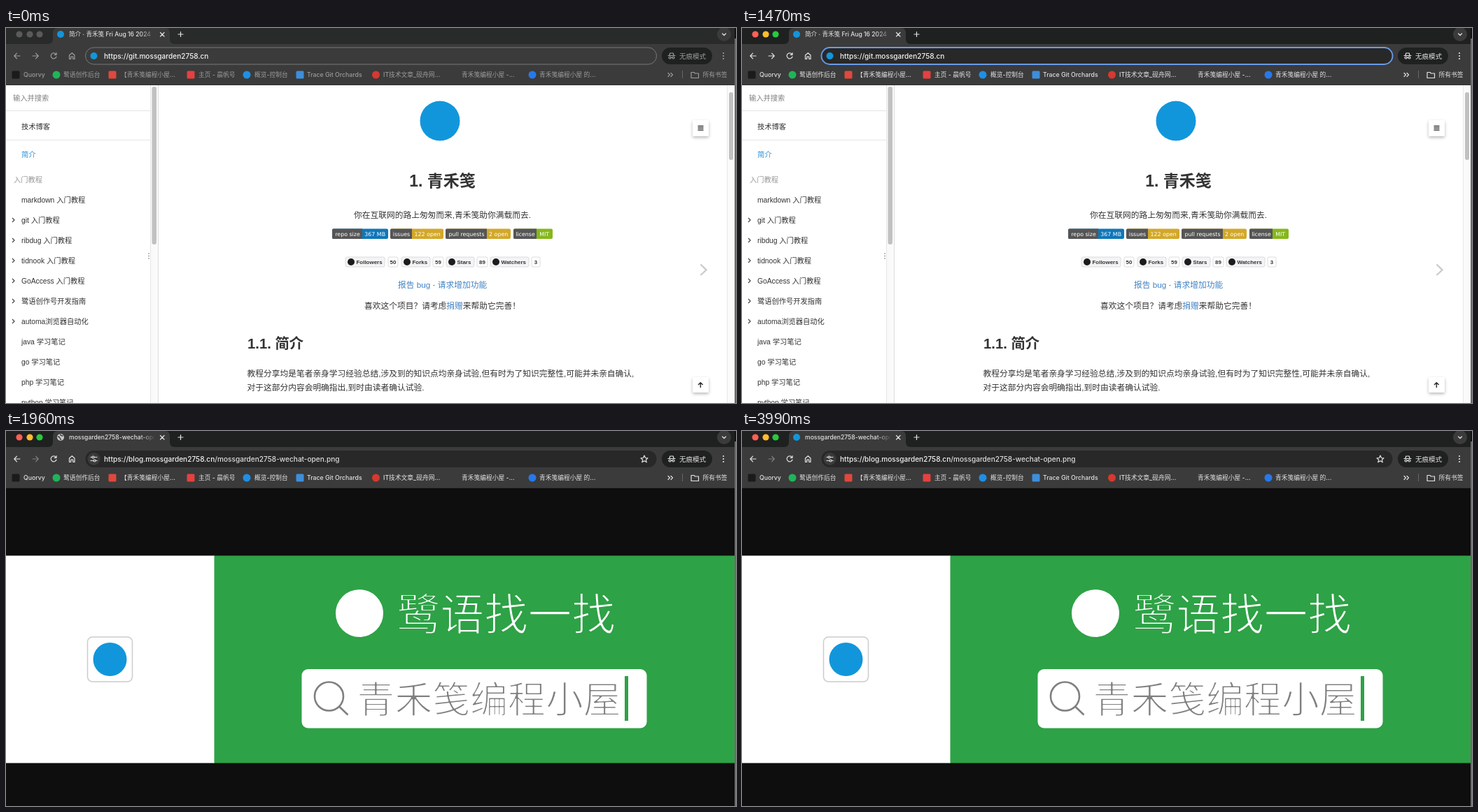
These frames come from a looping animation (1043x537 px, 4.13 s). An HTML page:

```html
<!DOCTYPE html>
<html lang="zh-CN">
<head>
<meta charset="utf-8">
<title>Browser demo</title>
<style>
html, body { margin: 0; width: 100%; height: 100%; overflow: hidden; background: #fff; }
svg { display: block; width: 100vw; height: 100vh; }
text { white-space: pre; }
.ui { font-family: Inter, "Noto Sans CJK SC", "Noto Sans CJK", sans-serif; font-weight: 500; }
.doc { font-family: "Liberation Sans", "Noto Sans CJK SC", "Noto Sans CJK", sans-serif; }
.badge { font-family: "DejaVu Sans", sans-serif; font-size: 7.9px; fill: #fff; }
.line { fill: none; stroke: currentColor; stroke-width: 1.2; stroke-linecap: round; stroke-linejoin: round; }
/* A stroke in the background colour thins the glyphs to a light weight. */
.thin { stroke-width: 1.9; stroke-linejoin: round; }
</style>
</head>
<body>
<svg id="stage" viewBox="0 0 1043 537" preserveAspectRatio="none">
  <defs>
    <linearGradient id="fade">
      <stop offset="0" stop-color="#3b3b3b" stop-opacity="0"/>
      <stop offset="1" stop-color="#3b3b3b"/>
    </linearGradient>
    <clipPath id="tabClip"><rect x="88" y="0" width="124" height="20"/></clipPath>
    <filter id="shadow" x="-50%" y="-50%" width="200%" height="200%">
      <feDropShadow dx="0" dy="2" stdDeviation="2.2" flood-opacity=".28"/>
    </filter>
  </defs>

  <g id="blog" class="doc" fill="#333">
    <rect width="1043" height="537" fill="#fff"/>
    <path d="M0 118.5H206M0 160.5H206M206.5 82V537" stroke="#e6e6e6" fill="none"/>
    <rect x="207" y="82" width="10" height="455" fill="#fafafa"/>
    <path d="M217.5 82V537" stroke="#dcdcdc"/>
    <rect x="208.5" y="84" width="6.5" height="226" rx="3.2" fill="#c1c1c1"/>
    <g id="menu" font-size="10.25"></g>
    <g fill="#aaa"><circle cx="204" cy="323" r="1"/><circle cx="204" cy="326.5" r="1"/><circle cx="204" cy="330" r="1"/></g>

    <circle cx="620" cy="133" r="28.5" fill="#1296db"/>
    <text x="623.5" y="227" font-size="23" font-weight="700" text-anchor="middle">1. 青禾笺</text>
    <g font-size="11.74">
      <text x="497" y="272">你在互联网的路上匆匆而来,青禾笺助你满载而去.</text>
      <text x="560" y="372" fill="#4183c4">报告 bug<tspan fill="#333"> · </tspan>请求增加功能</text>
      <text x="512" y="401.5">喜欢这个项目？请考虑<tspan fill="#4183c4">捐赠</tspan>来帮助它完善！</text>
      <text x="344.5" y="499">教程分享均是笔者亲身学习经验总结,涉及到的知识点均亲身试验,但有时为了知识完整性,可能并未亲自确认,</text>
      <text x="344.5" y="518.5">对于这部分内容会明确指出,到时由读者确认试验.</text>
    </g>
    <text x="345" y="458.5" font-size="20.3" font-weight="700">1.1. 简介</text>
    <g id="badges"></g>
    <g id="counts" font-size="7.95" font-weight="700"></g>

    <path d="M992.5 338.5L1000.5 346.3L992.5 354" fill="none" stroke="#ccc" stroke-width="2.4"/>
    <g filter="url(#shadow)" fill="#fff">
      <rect x="981" y="132" width="23" height="23" rx="2"/>
      <rect x="981" y="500" width="23" height="22" rx="2"/>
    </g>
    <path d="M988.5 140.5H996.5M988.5 143.2H996.5M988.5 145.9H996.5M992.3 515V508M989 511L992.3 507.7L995.6 511" fill="none" stroke="#333" stroke-width="1.5"/>
    <rect x="1030" y="82" width="11" height="455" fill="#fafafa"/>
    <path d="M1030.5 82V537" stroke="#e8e8e8"/>
    <rect x="1033" y="92" width="6" height="97" rx="3" fill="#c1c1c1"/>
  </g>

  <g id="poster" class="doc">
    <rect width="1043" height="537" fill="#0e0e0e"/>
    <rect y="178.5" width="298" height="297" fill="#fff"/>
    <rect x="297.5" y="178.5" width="743.5" height="297" fill="#2ea246"/>
    <rect x="116.5" y="295" width="64" height="64" rx="7" fill="#fff" stroke="#ccc" stroke-width="1.5"/>
    <circle cx="148.5" cy="327" r="24" fill="#1296db"/>
    <circle cx="505" cy="261" r="34" fill="#fff"/>
    <text class="thin" x="558" y="284.5" font-size="62.6" fill="#fff" stroke="#2ea246">鹭语找一找</text>
    <rect x="422.5" y="341" width="493" height="84.5" rx="9" fill="#fff"/>
    <path d="M482 380a20.5 20.5 0 1 1-41 0a20.5 20.5 0 1 1 41 0M476 394.5L488.5 406.5" fill="none" stroke="#808080" stroke-width="2.6"/>
    <text class="thin" x="501.5" y="404" font-size="53.9" fill="#808080" stroke="#fff">青禾笺编程小屋</text>
    <rect x="884" y="351" width="5" height="64" fill="#2ea246"/>
  </g>

  <g id="chrome" class="ui">
    <rect id="strip" width="1043" height="24" fill="#1f2020"/>
    <path d="M0 23H60Q67 23 67 16V7Q67 0 74 0H227Q234 0 234 7V16Q234 23 241 23H1043V82H0Z" fill="#3b3b3b"/>
    <circle cx="1026" cy="9" r="10" fill="#3b3b3b"/>
    <g id="lights"></g>
    <circle id="tabIcon" cx="78" cy="9" r="5" fill="#1296db"/>
    <g id="globe">
      <circle cx="78" cy="9" r="5" fill="#c8c8c8"/>
      <path d="M74 8q2.5 0 3 2t2 3M77 4.5q1 2.5 4.500 2.500" fill="none" stroke="#3b3b3b" stroke-width="1.3"/>
    </g>
    <g clip-path="url(#tabClip)"><text id="title" x="90" y="12" font-size="8.6" fill="#e3e3e3"></text></g>
    <rect x="192" y="2" width="21" height="16" fill="url(#fade)"/>
    <path d="M220.5 6.5L226 12M226 6.5L220.5 12M249.5 5.5V12.5M246 9H253M1023.5 8L1026 10.5L1028.5 8" class="line" color="#e3e3e3"/>

    <rect id="omnibox" x="113.5" y="28" width="816" height="24" rx="12"/>
    <circle id="siteDisc" cx="125.5" cy="40" r="9" fill="#3b3b3b"/>
    <circle id="siteIcon" cx="125.5" cy="40" r="5" fill="#1296db"/>
    <path id="info" class="line" color="#e3e3e3" d="M130.5 40a5 5 0 1 1-10 0a5 5 0 1 1 10 0M125.5 39.5V42.5M125.5 37.4V37.5"/>
    <path id="tune" class="line" color="#e3e3e3" d="M121 37.5H123M126.5 37.5H130M121 42.5H124.5M128 42.5H130M126 37.5a1.5 1.5 0 1 1-3 0a1.5 1.5 0 1 1 3 0M128 42.5a1.5 1.5 0 1 1-3 0a1.5 1.5 0 1 1 3 0"/>
    <text id="url" x="140" y="43.6" font-size="10.1" fill="#f4f4f4"><tspan id="host"></tspan><tspan id="path" fill="#dedede"></tspan></text>
    <rect id="caret" y="34.5" width="1" height="11.5" fill="#fff"/>
    <path id="star" class="line" color="#e3e3e3" d="M912 35L913.5 38.5L917 38.8L914.3 41.2L915.2 44.8L912 42.8L908.8 44.8L909.7 41.2L907 38.8L910.5 38.5Z"/>

    <rect x="937" y="28" width="72" height="24" rx="12" fill="#1f2020"/>
    <g id="tools">
      <path class="line" d="M20 40H12M15.5 36.2L11.8 40L15.5 43.8"/>
      <path id="forward" class="line" d="M38 40H46M42.5 36.2L46.2 40L42.5 43.8"/>
      <path id="reload" class="line" d="M71.2 37.3A4 4 0 1 0 72 41M72 35.5V38.3H69.2"/>
      <path id="stop" class="line" d="M65 37L71 43M71 37L65 43"/>
      <path class="line" d="M90.5 39L94.3 35.7L98 39V44.5H95.8V41.2H92.7V44.5H90.5Z"/>
      <path class="line" d="M946 39.5H956M948 39L948.8 36H953.2L954 39M950 42.5a1.5 1.5 0 1 1-3 0a1.5 1.5 0 1 1 3 0M955 42.5a1.5 1.5 0 1 1-3 0a1.5 1.5 0 1 1 3 0M950 42.3H952"/>
      <text x="962" y="43.5" font-size="9.5" fill="currentColor">无痕模式</text>
      <g fill="currentColor"><circle cx="1025" cy="36" r="1.1"/><circle cx="1025" cy="40" r="1.1"/><circle cx="1025" cy="44" r="1.1"/></g>
      <g id="marks" font-size="8.75" fill="currentColor"></g>
      <path class="line" d="M946 64.5L948.5 67L946 69.5M950 64.5L952.5 67L950 69.5M979 63.5H983L984.5 65H989.5V71.5H979Z"/>
    </g>
    <path d="M966.5 61V72" stroke="#666"/>
    <path d="M0 81.5H1041" stroke="#323232"/>
  </g>
  <path d="M1042 0V537" stroke="#6a6a6a" stroke-width="2"/>
  <path d="M1042 0V15" stroke="#111" stroke-width="2"/>
</svg>
<script>
const LOOP = 4130;
const $ = id => document.getElementById(id);

function add(parent, tag, attrs, text) {
  const el = document.createElementNS('http://www.w3.org/2000/svg', tag);
  for (const key in attrs) el.setAttribute(key, attrs[key]);
  if (text) el.textContent = text;
  parent.appendChild(el);
  return el;
}
const rect = (parent, x, y, width, height, fill, more) =>
  add(parent, 'rect', { x, y, width, height, fill, ...more });
const label = (parent, x, y, text, more) => add(parent, 'text', { x, y, ...more }, text);

function buildMenu() {
  const menu = $('menu');
  label(menu, 10, 104, '输入并搜索', { fill: '#808080' });
  label(menu, 22, 144.5, '技术博客');
  label(menu, 22, 184.5, '简介', { fill: '#2a8fd8' });
  label(menu, 11, 220.5, '入门教程', { fill: '#999' });
  const items = ['markdown 入门教程', '>git 入门教程', '>ribdug 入门教程', '>tidnook 入门教程',
    '>GoAccess 入门教程', '>鹭语创作号开发指南', '>automa浏览器自动化',
    'java 学习笔记', 'go 学习笔记', 'php 学习笔记', 'python 学习笔记'];
  items.forEach((item, i) => {
    const y = 246 + i * 29;
    label(menu, 22, y + 3.7, item.replace('>', ''));
    if (item[0] === '>') add(menu, 'path', { d: `M9 ${y - 3}l3 3l-3 3`, fill: 'none', stroke: '#444', 'stroke-width': 1.2 });
  });
}

function buildBadges() {
  const badges = [
    [466, 509, 546, 'repo size', '367 MB', '#0f77b8'],
    [549, 580, 625, 'issues', '122 open', '#d3a829'],
    [628, 687, 721, 'pull requests', '2 open', '#d3a829'],
    [725, 758, 781, 'license', 'MIT', '#85b81a']
  ];
  for (const [x, mid, end, name, value, color] of badges) {
    rect($('badges'), x, 287.5, end - x, 14.5, color, { rx: 2 });
    add($('badges'), 'path', { d: `M${mid} 287.5H${x + 2}q-2 0-2 2v10.5q0 2 2 2H${mid}Z`, fill: '#555' });
    const style = { class: 'badge', 'text-anchor': 'middle' };
    label($('badges'), (x + mid) / 2 + .5, 297.7, name, style);
    label($('badges'), (mid + end) / 2 - .3, 297.7, value, style);
  }
  const counts = [
    [485, 541, 'Followers', 546, 560, '50'], [565, 606, 'Forks', 610, 625, '59'],
    [629, 669, 'Stars', 673, 688, '89'], [692, 747, 'Watchers', 751, 763, '3']
  ];
  const box = { rx: 2, stroke: '#d3d3d3', 'stroke-width': .8 };
  for (const [x, end, name, cx, cend, count] of counts) {
    rect($('counts'), x, 328, end - x, 14, '#f3f4f5', box);
    rect($('counts'), cx, 328, cend - cx, 14, '#fff', box);
    add($('counts'), 'circle', { cx: x + 8, cy: 335, r: 5, fill: '#1c1c1c' });
    label($('counts'), x + 15.5, 338, name);
    label($('counts'), (cx + cend) / 2, 338, count, { 'text-anchor': 'middle' });
  }
}

function buildBookmarks() {
  const marks = [
    [14, '#1b1b1b', 25, 'Quorvy'], [72, '#20b45a', 82, '鹭语创作后台', 1],
    [152, '#e0483c', 164, '【青禾笺编程小屋...'], [264, '#e5413f', 275, '主页 - 晨帆号'],
    [344, '#1f8fe5', 355, '概览-控制台', 1], [420, '#3d8edb', 430, 'Trace Git Orchards'],
    [528.5, '#d8382f', 539, 'IT技术文章_砚舟网...', 1], [0, '', 651, '青禾笺编程小屋 -...'],
    [752, '#2878e8', 762, '青禾笺编程小屋 的...', 1], [0, '', 995.5, '所有书签']
  ];
  for (const [cx, color, x, name, round] of marks) {
    if (color) rect($('marks'), cx - 5.5, 61.5, 11, 11, color, { rx: round ? 5.5 : 1.5 });
    label($('marks'), x, 70, name);
  }
}

const lights = [19, 34, 48].map(cx => add($('lights'), 'circle', { cx, cy: 9, r: 4.6 }));
const lightColors = ['#fe5f57', '#febc2e', '#28c840'];
const show = (id, on) => $(id).setAttribute('display', on ? 'inline' : 'none');
const setText = (id, text) => { if ($(id).textContent !== text) $(id).textContent = text; };

function update(t) {
  const active = t >= 910;
  const focused = active && t < 1610;
  const loading = t >= 1610 && t < 1960;
  const poster = t >= 1960;
  const plain = t < 1610;

  show('blog', !poster);
  show('poster', poster);
  $('strip').setAttribute('fill', active ? '#1f2020' : '#292a2a');
  lights.forEach((el, i) => el.setAttribute('fill', active ? lightColors[i] : '#5a5a5a'));
  $('tools').setAttribute('color', active ? '#e3e3e3' : '#9c9c9c');
  $('forward').setAttribute('opacity', poster ? .4 : 1);

  const box = $('omnibox');
  box.setAttribute('fill', active ? '#282828' : '#3b3b3b');
  box.setAttribute('stroke', focused ? '#699bea' : active ? 'none' : '#787878');
  box.setAttribute('stroke-width', focused ? 1.8 : 1);

  show('reload', !loading);
  show('stop', loading);
  show('siteIcon', plain);
  show('siteDisc', !plain);
  show('info', loading);
  show('tune', poster);
  show('star', !plain);
  show('tabIcon', plain || t >= 2100);
  show('globe', poster && t < 2100);

  setText('title', poster ? 'mossgarden2758-wechat-open.png' : '简介 · 青禾笺 Fri Aug 16 2024');
  setText('host', poster ? 'https://blog.mossgarden2758.cn' : 'https://git.mossgarden2758.cn');
  setText('path', poster ? '/mossgarden2758-wechat-open.png' : '');
  show('caret', active && t < 1470);
  if (focused) $('caret').setAttribute('x', 140.5 + $('url').getComputedTextLength());
}

buildMenu();
buildBadges();
buildBookmarks();
const start = performance.now();
function tick() {
  update((performance.now() - start) % LOOP);
  requestAnimationFrame(tick);
}
tick();
</script>
</body>
</html>
```
